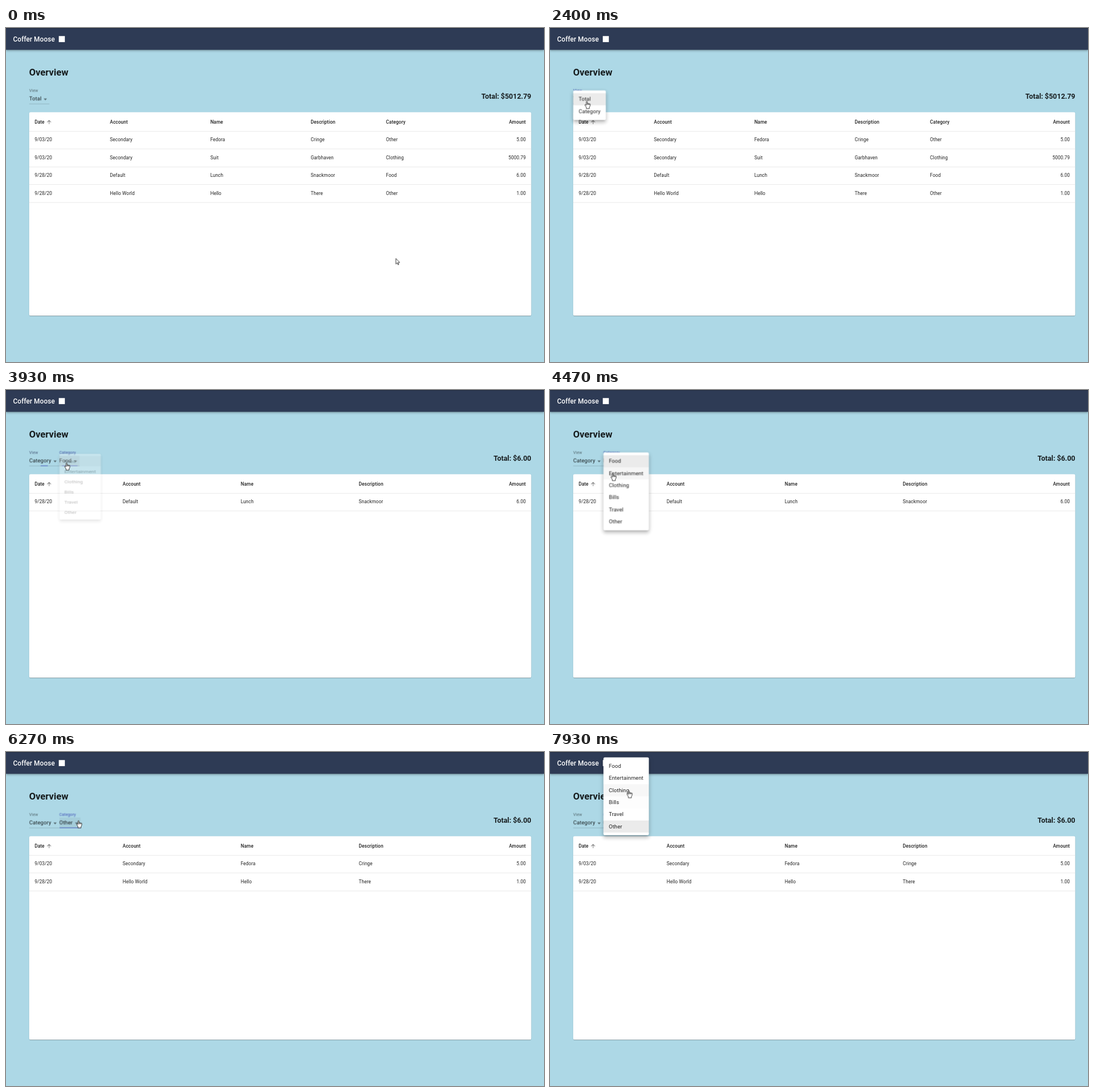
Write an HTML page that moves like this. It is 949 px wide and 590 px high and loops after 8 s.

```html
<!DOCTYPE html>
<html lang="en">
<head>
<meta charset="utf-8">
<title>Coffer Moose</title>
<style>
html, body { margin: 0; width: 100%; height: 100%; overflow: hidden; background: #add8e6; }
body { position: relative; }
#app {
  position: absolute; left: 0; top: 0; width: 1600px; height: 995px;
  transform: scale(.593125); transform-origin: 0 0;
  font: 14px/24px Roboto, Arial, sans-serif; color: rgba(0,0,0,.87);
}
#app div, #app svg { position: absolute; white-space: nowrap; }
#app .bar {
  left: 0; top: 0; width: 1600px; height: 63px; background: #2e3b55; border-top: 2px solid #242d40;
  box-shadow: 0 2px 4px -1px rgba(0,0,0,.2), 0 4px 5px rgba(0,0,0,.14), 0 1px 10px rgba(0,0,0,.12);
}
.brand { font-size: 20px; font-weight: 500; letter-spacing: .0075em; color: #fff; }
.mark { left: 157px; top: 24px; width: 18px; height: 18px; background: #fff; }
.h1 { font-size: 28.2px; font-weight: 700; }
.sum { font-size: 21px; font-weight: 700; }
.card {
  left: 69px; top: 251px; width: 1493px; height: 606px; border-radius: 4px; background: #fff;
  box-shadow: 0 2px 1px -1px rgba(0,0,0,.2), 0 1px 1px rgba(0,0,0,.14), 0 1px 3px rgba(0,0,0,.12);
}
.cell { letter-spacing: .01071em; }
.head { font-weight: 500; }
.line { left: 69px; width: 1493px; height: 1px; background: #dcdcdc; }
.pick { top: 195px; height: 32px; padding-right: 24px; font-size: 16px; letter-spacing: .00938em; }
#app .pick .value { position: relative; top: 4px; }
.pick .tint { inset: 0; background: rgba(0,0,0,.05); }
.pick .label { left: 0; top: -20px; font-size: 12px; }
.pick .rule { left: 0; right: 0; bottom: 0; height: 1px; background: rgba(0,0,0,.42); }
.pick .focus { left: 0; right: 0; bottom: 0; height: 2px; background: #3f51b5; }
.pick svg { right: 0; top: 5px; fill: rgba(0,0,0,.54); }
.menu {
  padding: 8px 0; border-radius: 4px; background: #fff; font-size: 16px; letter-spacing: .00938em;
  box-shadow: 0 5px 5px -3px rgba(0,0,0,.2), 0 8px 10px 1px rgba(0,0,0,.14), 0 3px 14px 2px rgba(0,0,0,.12);
}
#app .item { position: relative; height: 36px; padding: 0 16px; line-height: 36px; overflow: hidden; }
.ripple { border-radius: 50%; background: #000; }
.pointer { left: 0; top: 0; }
.pointer svg { overflow: visible; fill: #fff; stroke: #000; stroke-width: 1.3; stroke-linejoin: round; }
</style>
</head>
<body>
<div id="app"></div>
<script>
const LOOP = 8000;
const STD = 'cubic-bezier(.4,0,.2,1)', OUT = 'cubic-bezier(0,0,.2,1)', STEP = 'step-end';
const app = document.getElementById('app');
const start = document.timeline.currentTime || 0;

function add(parent, cls, text = '', style = {}) {
  const el = document.createElement('div');
  el.className = cls;
  el.textContent = text;
  Object.assign(el.style, style);
  parent.append(el);
  return el;
}
const svg = (w, h, d) =>
  `<svg width="${w}" height="${h}" viewBox="0 0 ${w} ${h}"><path d="${d}"/></svg>`;

// Text at x, centred on y; right-aligned when x is negative
const put = (parent, cls, text, x, y) => add(parent, cls, text,
  { [x < 0 ? 'right' : 'left']: Math.abs(x) + 'px', top: y - 12 + 'px' });

// steps: [time, properties, easing towards the next step]; a later step at the same time wins
function run(el, steps) {
  const frames = new Map();
  for (const [t, props, easing = 'linear'] of [[0, steps[0][1]], ...steps, [LOOP, steps.at(-1)[1]]]) {
    const offset = Math.min(t / LOOP, 1);
    frames.set(offset, { ...props, offset, easing });
  }
  el.animate([...frames.values()], { duration: LOOP, iterations: Infinity }).startTime = start;
}
function show(el, ...spans) {
  const steps = [[0, { opacity: 0 }, STEP]];
  for (const [from, to] of spans)
    steps.push([from, { opacity: 1 }, STEP], [to, { opacity: 0 }, STEP]);
  run(el, steps);
}
// Goes a -> b at "from" and back to a at "to"
function pulse(el, prop, a, b, from, to, ms, ease) {
  const steps = [[from, { [prop]: a }, ease], [from + ms, { [prop]: b }]];
  if (to < LOOP) steps.push([to, { [prop]: b }, ease], [to + ms, { [prop]: a }]);
  run(el, steps);
}

// Page
const T = { view: 3050, other: 5310 };
add(app, 'bar');
put(app, 'brand', 'Coffer Moose', 21, 33);
add(app, 'mark');
put(app, 'h1', 'Overview', 68.5, 133);
add(app, 'card');

const data = [
  ['9/03/20', 'Secondary', 'Fedora', 'Cringe', 'Other', '5.00'],
  ['9/03/20', 'Secondary', 'Suit', 'Garbhaven', 'Clothing', '5000.79'],
  ['9/28/20', 'Default', 'Lunch', 'Snackmoor', 'Food', '6.00'],
  ['9/28/20', 'Hello World', 'Hello', 'There', 'Other', '1.00']
];
const titles = ['Date', 'Account', 'Name', 'Description', 'Category', 'Amount'];

function table(category, total, from, to) {
  const box = add(app, 'table', '', { left: 0, top: 0, width: '1600px', height: '995px' });
  const cols = category ? [85, 347, 698, 1049, -54] : [85, 309, 607.6, 906.2, 1130.1, -54];
  const rows = data.filter(r => !category || r[4] === category);
  [titles, ...rows].forEach((row, i) => {
    const cells = category ? row.filter((_, c) => c !== 4) : row;
    const y = i ? 280 + 53 * i : 279.5;
    cells.forEach((text, c) => put(box, i ? 'cell' : 'cell head', text, cols[c], y));
    add(box, 'line', '', { top: 307 + 53 * i + 'px' });
  });
  put(box, 'sum', 'Total: ' + total, -38, 204);
  show(box, [from, to]);
}
table('', '$5012.79', 0, T.view);
table('Food', '$6.00', T.view, T.other);
table('Other', '$6.00', T.other, LOOP);
add(app, 'sort', '', { left: '119px', top: '271px' }).innerHTML =
  '<svg width="18" height="18" viewBox="0 0 24 24" fill="#666"><path d="M4 12l1.4 1.4L11 7.8V20h2V7.8l5.6 5.6L20 12l-8-8z"/></svg>';

// Dropdown fields
function pick(label, value, left, [from, to], [focus, blur]) {
  const box = add(app, 'pick', '', { left: left + 'px' });
  show(add(box, 'tint'), [focus, blur]);
  add(box, 'value', value);
  const name = add(box, 'label', label);
  pulse(name, 'color', 'rgba(0,0,0,.54)', '#3f51b5', focus, blur, 200, OUT);
  box.insertAdjacentHTML('beforeend', svg(24, 24, 'M7 10l5 5 5-5z'));
  add(box, 'rule');
  pulse(add(box, 'focus'), 'transform', 'scaleX(0)', 'scaleX(1)', focus, blur, 200, OUT);
  show(box, [from, to]);
}
const viewFocus = [1990, 3850], catFocus = [3850, LOOP];
pick('View', 'Total', 69, [0, T.view], viewFocus);
pick('View', 'Category', 69, [T.view, LOOP], viewFocus);
pick('Category', 'Food', 158.5, [T.view, T.other], catFocus);
pick('Category', 'Other', 158.5, [T.other, LOOP], catFocus);

// Popup menus
const kinds = ['Food', 'Entertainment', 'Clothing', 'Bills', 'Travel', 'Other'];
const menus = [
  { items: ['Total', 'Category'], left: 69, top: 185.5, pivot: 26, on: 0, open: 1990, close: 3070, ms: 218,
    hover: { 1: [2480, LOOP] }, tap: { item: 1, x: 42, y: 24, r: 70, at: 2935 } },
  { items: kinds, left: 158.5, top: 185.5, pivot: 26, on: 0, open: 3850, close: 5340, ms: 292,
    hover: { 1: [4388, 4549], 2: [4549, 4711], 3: [4711, 4872], 4: [4872, 5033], 5: [5033, LOOP] },
    tap: { item: 5, x: 57, y: 13, r: 95, at: 5195 } },
  { items: kinds, left: 158.5, top: 16, pivot: 195.5, on: 5, open: 6290, close: LOOP, ms: 292,
    hover: { 4: [7610, 7733], 3: [7733, 7866], 2: [7866, LOOP] } }
];
for (const m of menus) {
  const box = add(app, 'menu', '', {
    left: m.left + 'px', top: m.top + 'px', transformOrigin: `0 ${m.pivot}px`
  });
  const small = { transform: 'scale(.75,.5625)' }, full = { transform: 'scale(1,1)' };
  const grow = [[m.open, small, STD], [m.open + m.ms * .666, full]];
  if (m.close < LOOP) grow.push([m.close + m.ms * .333, full, STD], [m.close + m.ms, small]);
  run(box, grow);
  pulse(box, 'opacity', 0, 1, m.open, m.close, m.ms, STD);

  m.items.forEach((text, i) => {
    const item = add(box, 'item', text);
    if (i === m.on) item.style.background = 'rgba(0,0,0,.08)';
    else if (m.hover[i])
      pulse(item, 'backgroundColor', 'rgba(0,0,0,0)', 'rgba(0,0,0,.04)', ...m.hover[i], 120, STD);
    if (m.tap?.item !== i) return;
    const { x, y, r, at } = m.tap;
    const drop = add(item, 'ripple', '', {
      left: x - r + 'px', top: y - r + 'px', width: 2 * r + 'px', height: 2 * r + 'px'
    });
    run(drop, [
      [at, { transform: 'scale(0)', opacity: 0 }, STEP],
      [at + 1, { transform: 'scale(0)', opacity: .1 }, STD],
      [at + 550, { transform: 'scale(1)', opacity: .3 }]
    ]);
  });
}

// Pointer
const pointer = add(app, 'pointer');
const arrow = add(pointer, 'arrow'), hand = add(pointer, 'hand', '', { left: '-6px', top: 0 });
arrow.innerHTML = svg(12, 20, 'M.5.5V17L4.3 13.4 6.8 19.2 9.2 18.2 6.7 12.5H12Z');
hand.innerHTML = svg(17, 23,
  'M6.5.6C5.5.6 4.9 1.3 4.9 2.2V12L3.2 10.4C2.4 9.6 1.2 9.7.8 10.5.4 11.3.9 12.1 1.5 12.9L5 17.7V22H14V17.7' +
  'C15.6 16 16.5 14.2 16.5 12V8.8C16.5 7.2 14.2 7 13.8 8.4 13.7 6.7 11.3 6.3 11 7.8 10.8 6.2 8.2 5.9 8.1 7.4V2.2' +
  'C8.1 1.3 7.5.6 6.5.6ZM8.1 7.4V11M11 7.8V11M13.8 8.4V11');
show(arrow, [0, 1780], [3270, 3500], [5630, 5870]);
show(hand, [1780, 3270], [3500, 5630], [5870, LOOP]);

const path = [
  [70, 1159, 686, 'ease-in-out'], [400, 408, 199],
  [1470, 408, 199, 'ease-in-out'], [1870, 109, 218],
  [2400, 109, 218, 'ease-in-out'], [2600, 111, 254],
  [3280, 111, 254, 'ease-in-out'], [3600, 179.5, 216.5],
  [4330, 179.5, 216.5], [5070, 215, 382],
  [5640, 215, 382, 'ease-in-out'], [5930, 215, 204],
  [7600, 215, 204], [7930, 234, 114.5]
];
// Stays at the last point until the loop restarts
run(pointer, path.map(([t, x, y, ease]) => [t, { transform: `translate(${x}px,${y}px)` }, ease]));
</script>
</body>
</html>
```
